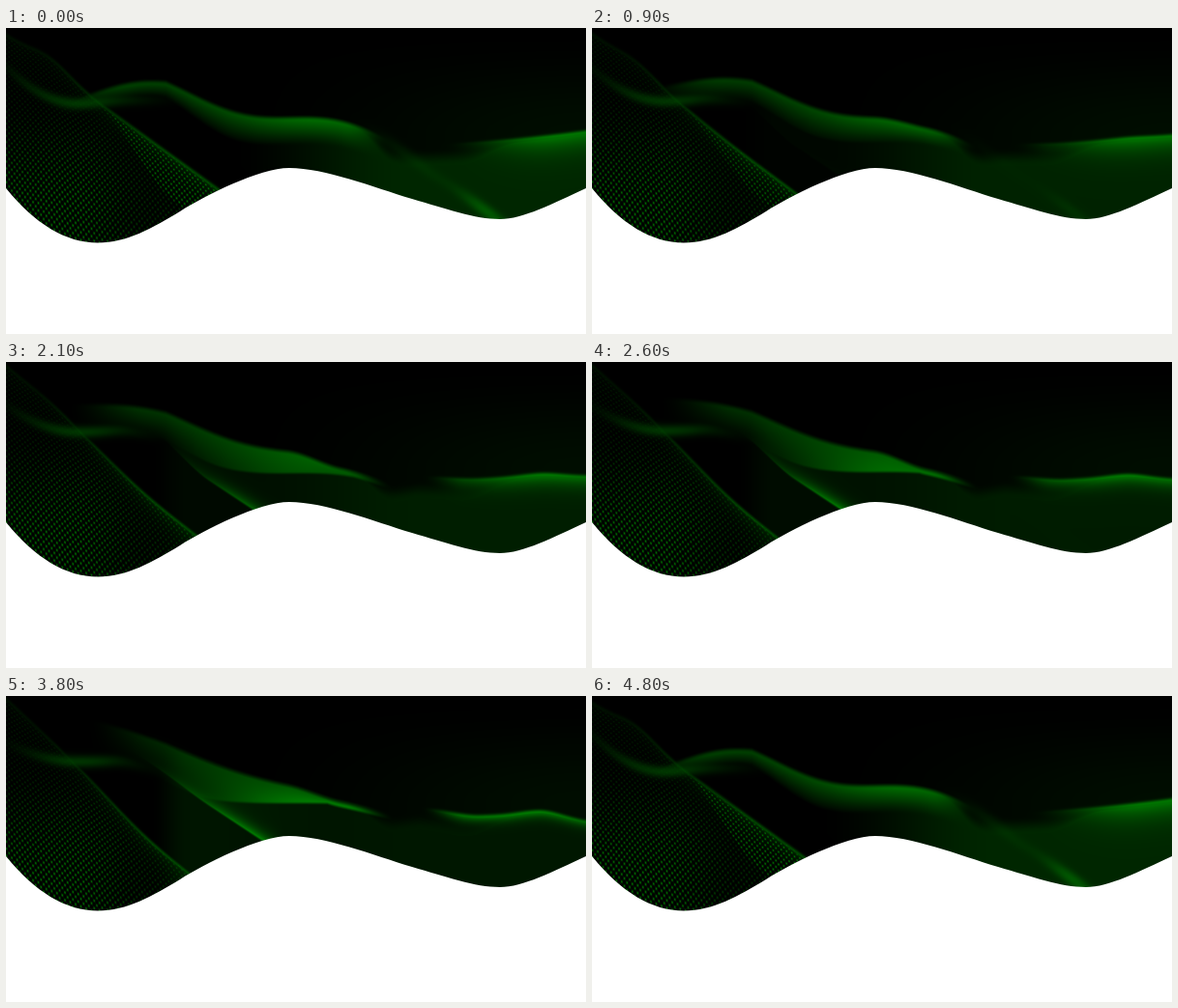
Animation of 600x317 px, one loop 5000 ms. Source, as an HTML page with a canvas:

```html
<!DOCTYPE html>
<html lang="en">
<head>
<meta charset="utf-8">
<title>Green wave</title>
<style>
html, body { margin: 0; width: 100%; height: 100%; overflow: hidden; background: #fff; }
canvas { display: block; width: 600px; height: 317px; }
</style>
</head>
<body>
<canvas id="stage" width="600" height="317"></canvas>
<script>
const W = 600, H = 317, DEPTH = 224;
const LOOP = 5000, STEP = 100, LAST = 4800;
const ctx = document.getElementById('stage').getContext('2d');
const image = ctx.createImageData(W, DEPTH);

const clamp = (v, a, b) => Math.min(b, Math.max(a, v));
const mix = (a, b, k) => a + (b - a) * k;
const smooth = (a, b, v) => {
  const k = clamp((v - a) / (b - a), 0, 1);
  return k * k * (3 - 2 * k);
};
const bell = (d, s) => Math.exp(-d * d / (2 * s * s));
const wave = (x, from, period) => Math.sin(2 * Math.PI * (x - from) / period);

// Main ribbon: a rippled slope that straightens out.
function ribbon(x, k) {
  const bright = smooth(0.1, 0.7, k);
  const rippled = 56 + 0.2375 * (x - 140) + 8.5 * wave(x, 190, 210) + 0.33 * Math.max(0, 165 - x);
  const straight = 26 + 0.33 * (x - 110) + 8 * wave(x, 130, 460);
  const dip = 10 * Math.sin(Math.PI * k) * smooth(290, 345, x);
  const top = mix(rippled, straight, k) + dip;
  const end = mix(rippled + 13 + 13 * smooth(150, 240, x),
    107 - 45 * (1 - smooth(80, 220, x)), k);
  const fade = smooth(mix(40, 90, k), mix(130, 170, k), x) * (1 - smooth(350, 405, x));
  return {
    top,
    thick: Math.max(4, end - top),
    light: fade * mix(72 + 40 * bell(x - 320, 45), 30 + 45 * smooth(140, 320, x), k),
    endLight: fade * mix(12, 122 * smooth(140, 320, x), bright)
  };
}

// Bright line on the right.
function crest(x, k) {
  const rising = 122 - 14 * Math.max(0, (x - 420) / 180) ** 1.7;
  const rolling = 115 + 12 * smooth(420, 490, x) - 5 * bell(x - 550, 20) + 13 * smooth(550, 620, x);
  return {
    y: mix(rising, rolling, k ** 1.2),
    light: mix(115 * smooth(440, 570, x),
      125 * smooth(425, 475, x) * (1 - 0.25 * smooth(540, 600, x)), k),
    fall: mix(19, 6, smooth(0, 0.9, k))
  };
}

// Inner strand that fades in beside the hill.
const strand = (x, k) => ({
  y: 62 + 0.66 * (x - 140) + 13 * (1 - smooth(0.45, 1, k)) * smooth(150, 210, x),
  light: 118 * smooth(0.12, 0.6, k) * smooth(mix(190, 100, k), 265, x) * (1 - smooth(275, 300, x))
});

const arch = (x, k) => {
  const dip = Math.max(0, 1 - x / 75) ** 2;
  return {
    y: mix(78 - 38 * dip - 4 * smooth(75, 130, x), 65 - 15 * dip + 27 * smooth(110, 200, x), k),
    light: 50 * bell(x - 75, mix(45, 35, k))
  };
};

// Upper rim of the dotted sheet and the fold hanging from it.
function sheet(x, k) {
  const s = smooth(-0.08, 0.7, k);
  const curled = 8 + 0.72 * x - 10 * bell(x - 45, 20);
  const taut = 3 + 0.93 * x + 9 * bell(x - 145, 40);
  return {
    y: mix(curled, taut, s),
    light: 20 + 75 * smooth(20, 180, x),
    fold: 46 * (1 - s) * smooth(90, 175, x),
    gain: 1 - s
  };
}

const body = (x, k) => mix(38 * smooth(230, 420, x),
  (19 + 17 * bell(x - 210, 60)) * smooth(148, 188, x), k);

// Staggered lattice that widens with depth.
function dots(x, y, rim) {
  const u = x / 5.5;
  const v = Math.log(1 + 0.004 * Math.max(0, y - 0.4 * rim)) / 0.018;
  const p = 0.5 + 0.5 * Math.cos(2 * Math.PI * u) * Math.cos(2 * Math.PI * v);
  return p ** 3;
}

function paintColumn(x, k) {
  const rib = ribbon(x, k), cr = crest(x, k), st = strand(x, k);
  const ar = arch(x, k), sh = sheet(x, k), fill = body(x, k);
  const top = mix(rib.top, cr.y, smooth(370, 430, x));
  const haze = 3 + 18 * smooth(360, 400, x) * (1 - smooth(470, 530, x));
  const sky = 13 * smooth(230, 600, x);
  const under = mix(0.4, 0.8, k);
  const crease = 122 + 0.7 * (x - 400);
  const creaseLight = (1 - k) ** 4 * (28 * bell(x - 425, 28) + 75 * bell(x - 498, 22));
  const meshFade = 1 - 0.6 * smooth(70, 150, x);

  for (let y = 0; y < DEPTH; y++) {
    let sum = 0;
    const add = v => { sum += v * v; };

    if (y < top + haze) add(sky * smooth(0, 110, y));
    add(fill * smooth(0, haze, y - top) * mix(1, under, smooth(-1, 2, y - st.y)));

    const r = y - rib.top;
    add(mix(rib.light, rib.endLight, clamp(r / rib.thick, 0, 1)) *
      smooth(-4, 3, r) * (1 - smooth(-1, 4, r - rib.thick)));

    const c = y - cr.y;
    add(cr.light * (c < 0 ? bell(c, 2.2) : Math.exp(-c / cr.fall)));
    const s = y - st.y;
    add(st.light * (s > 0 ? bell(s, 1.5) : Math.exp(s / 9)));
    add(ar.light * bell(y - ar.y, 4.5));
    add(creaseLight * bell(y - crease, 7));

    const e = y - sh.y;
    if (x < 235 && e > -6) {
      const grain = dots(x, y, sh.y);
      const inFold = smooth(0, 3, e) * (1 - smooth(-3, 3, e - sh.fold));
      const mesh = (22 + 85 * smooth(65, 185, y)) * meshFade + 65 * sh.gain * inFold;
      add(sh.light * 0.65 * bell(e, 1.7));
      if (e > 0) add(sh.light * 0.55 * Math.exp(-e / 12) * (0.6 + 0.5 * grain));
      add(mesh * grain * smooth(-1, 4, e));
    }

    const o = (y * W + x) * 4;
    image.data[o + 1] = Math.min(150, Math.sqrt(sum));
    image.data[o + 3] = 255;
  }
}

const hill = new Path2D(`M0 166 C30 203 62 222.5 95 222.5 C125 222.5 152 207 180 190
  C205 174 262 145 293 145 C330 145 380 165 420 177 C455 187 485 198 511 198
  C535 198 565 182 600 166 V317 H0 Z`);

function paint(t) {
  for (let x = 0; x < W; x++) paintColumn(x, t / 4700);
  ctx.putImageData(image, 0, 0);
  ctx.fillStyle = '#fff';
  ctx.fillRect(0, DEPTH, W, H - DEPTH);
  ctx.fill(hill);
}

let shown = -1;
const start = performance.now();
function tick() {
  const now = (performance.now() - start) % LOOP;
  let t = Math.floor(now / STEP) * STEP;
  if (t >= LAST) t = 0;
  if (t !== shown) paint(shown = t);
  requestAnimationFrame(tick);
}
tick();
</script>
</body>
</html>
```
